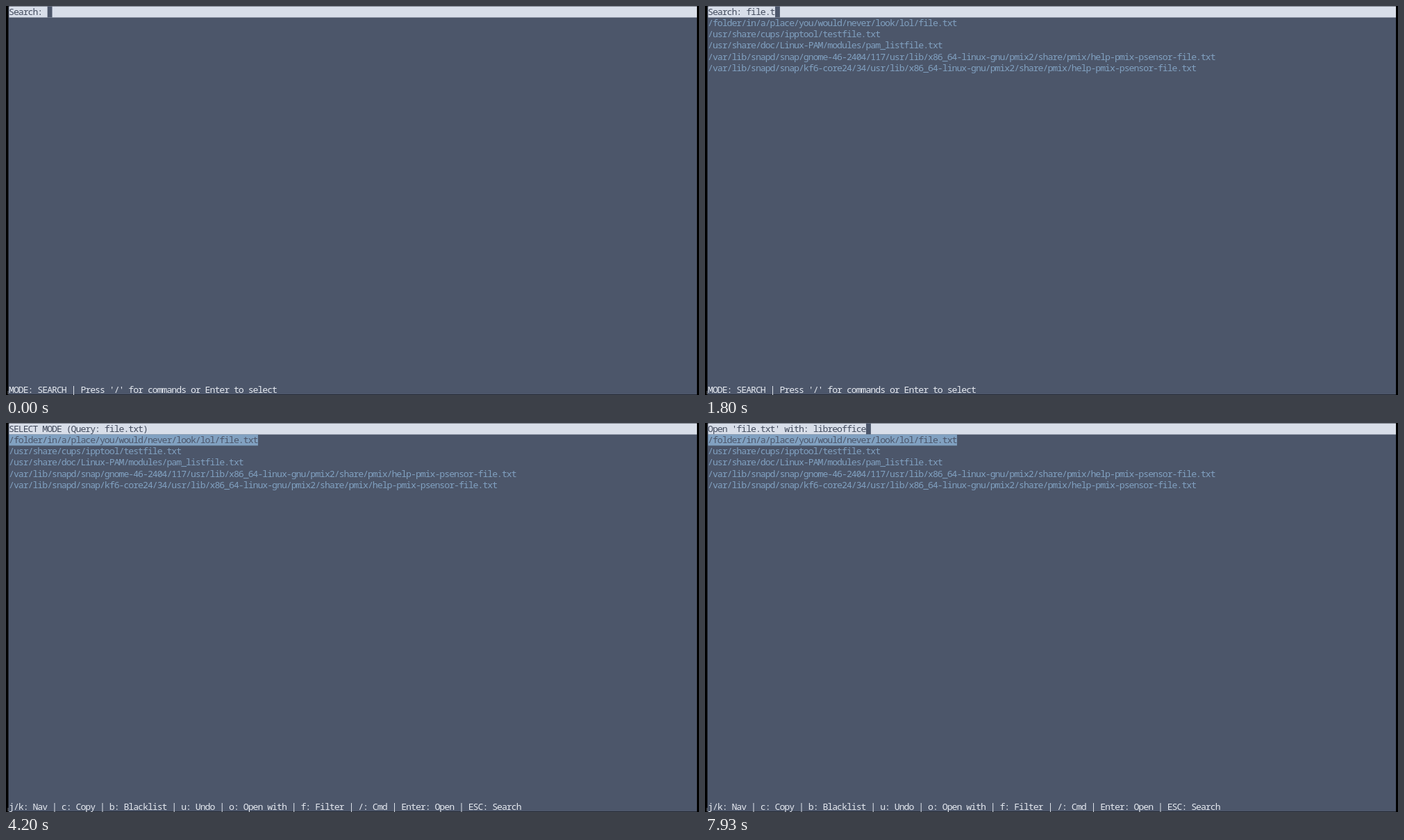
Write an HTML page with a canvas that moves like this. It is 998 px wide and 561 px high and loops after 8000 ms.

```html
<!DOCTYPE html>
<html lang="en">
<head>
<meta charset="utf-8">
<title>File search</title>
<style>
  html, body { margin: 0; width: 100%; height: 100%; overflow: hidden; background: #000; }
  canvas { display: block; width: 100vw; height: 100vh; }
</style>
</head>
<body>
<canvas id="stage" width="998" height="561"></canvas>
<script>
const ctx = document.getElementById('stage').getContext('2d');
const LOOP = 8000, COLS = 144, ROWS = 35;
const LEFT = 4.5, TOP = 0.5, CELL = 6.893, LINE = 16.03, BASE = 13.4;
const BG = '#4c566a', BAR = '#d8dee9', INK = '#434c5e', PATH = '#81a1c1', FOOT = '#e5e9f0';

const under = (dir, names) => names.split(' ').map(name => dir + name);

const efiFiles = [
  '/swapfile', '/boot/efi', '/boot/efi/EFI', '/boot/efi/System Volume Information',
  ...under('/boot/efi/EFI/', 'Boot GRUB Microsoft Boot/bootx64.efi GRUB/grubx64.efi Microsoft/Boot Microsoft/Recovery'),
  ...under('/boot/efi/EFI/Microsoft/Boot/',
    'BCD BCD.LOG BCD.LOG1 BCD.LOG2 BOOTSTAT.DAT CIPolicies Fonts Resources SecureBootRecovery.efi ' +
    'bg-BG boot.pnd.stl boot.stl bootmgfw.efi bootmgr.efi cs-CZ da-DK de-DE el-GR en-GB en-US es-ES es-MX')
];

const namedFiles = [
  '/swapfile',
  ...under('/boot/grub/x86_64-efi/', 'configfile.mod file.mod search_fs_file.mod'),
  ...under('/etc/', 'profile profile.d tmpfiles.d'),
  ...under('/etc/apparmor.d/abstractions/',
    'private-files private-files-strict apparmor_api/change_profile ubuntu-browsers.d/user-files'),
  ...under('/etc/', 'cups/cups-files.conf cups/cups-files.conf.default mpv/encoding-profiles.conf'),
  ...under('/etc/profile.d/',
    '70-systemd-shell-extra.sh 80-systemd-osc-context.sh cuda.sh debuginfod.csh debuginfod.sh ' +
    'flatpak-bindir.sh flatpak.csh flatpak.sh freetype2.sh gawk.csh gawk.sh gpm.sh gradle.sh ' +
    'jre.csh jre.sh libreoffice-fresh.csh libreoffice-fresh.sh locale.sh mercurial.sh ' +
    'perlbin.csh perlbin.sh snapd.sh vte.csh vte.sh')
];

const textFiles = [
  '/folder/in/a/place/you/would/never/look/lol/file.txt',
  '/usr/share/cups/ipptool/testfile.txt',
  '/usr/share/doc/Linux-PAM/modules/pam_listfile.txt',
  ...under('/var/lib/snapd/snap/', 'gnome-46-2404/117 kf6-core24/34')
    .map(dir => dir + '/usr/lib/x86_64-linux-gnu/pmix2/share/pmix/help-pmix-psensor-file.txt')
];

const QUERY = 'file.txt', queryKeys = [70, 600, 870, 1070, 1470, 1800, 1930, 2000];
const APP = 'libreoffice', appKeys = [6270, 6400, 6540, 6670, 6800, 6930, 7000, 7070, 7400, 7670, 7800];
const SELECT_AT = 4000, OPEN_AT = 6000;

const typed = (word, keys, t) => word.slice(0, keys.filter(k => k <= t).length);

function results(query) {
  if (!query) return [];
  if (query.length < 3) return efiFiles;
  if (query.length < 6) return namedFiles.filter(path => path.includes(query));
  return textFiles;
}

function fillCells(row, col, count, color) {
  ctx.fillStyle = color;
  ctx.fillRect(LEFT + col * CELL, TOP + row * LINE, count * CELL, LINE);
}

function write(row, text, color) {
  ctx.fillStyle = color;
  [...text].forEach((ch, i) => {
    if (ch !== ' ') ctx.fillText(ch, LEFT + (i + 0.5) * CELL, row * LINE + BASE);
  });
}

function draw(t) {
  const selecting = t >= SELECT_AT, opening = t >= OPEN_AT;
  const query = typed(QUERY, queryKeys, t);
  let header = 'Search: ' + query;
  if (opening) header = "Open 'file.txt' with: " + typed(APP, appKeys, t);
  else if (selecting) header = 'SELECT MODE (Query: file.txt)';

  ctx.fillStyle = '#000';
  ctx.fillRect(0, 0, 998, 561);
  ctx.fillStyle = BG;
  ctx.fillRect(3.5, TOP, 991.5, 560);
  ctx.font = '13.2px "Noto Sans Mono", "DejaVu Sans Mono", monospace';
  ctx.textAlign = 'center';
  ctx.textBaseline = 'alphabetic';

  fillCells(0, 0, COLS - 0.3, BAR);
  if (!selecting || opening) fillCells(0, header.length, 1, BG);
  write(0, header, INK);

  results(query).slice(0, ROWS - 2).forEach((path, i) => {
    const picked = selecting && i === 0;
    if (picked) fillCells(1, 0, path.length, PATH);
    write(i + 1, path, picked ? BG : PATH);
  });

  write(ROWS - 1, selecting
    ? 'j/k: Nav | c: Copy | b: Blacklist | u: Undo | o: Open with | f: Filter | /: Cmd | Enter: Open | ESC: Search'
    : "MODE: SEARCH | Press '/' for commands or Enter to select", FOOT);
  // sliver of light at the window's lower left edge
  ctx.fillStyle = 'rgba(216, 222, 233, 0.5)';
  ctx.fillRect(2.5, 555, 1, 5);
}

function tick() {
  draw(performance.now() % LOOP);
  requestAnimationFrame(tick);
}
tick();
</script>
</body>
</html>
```
